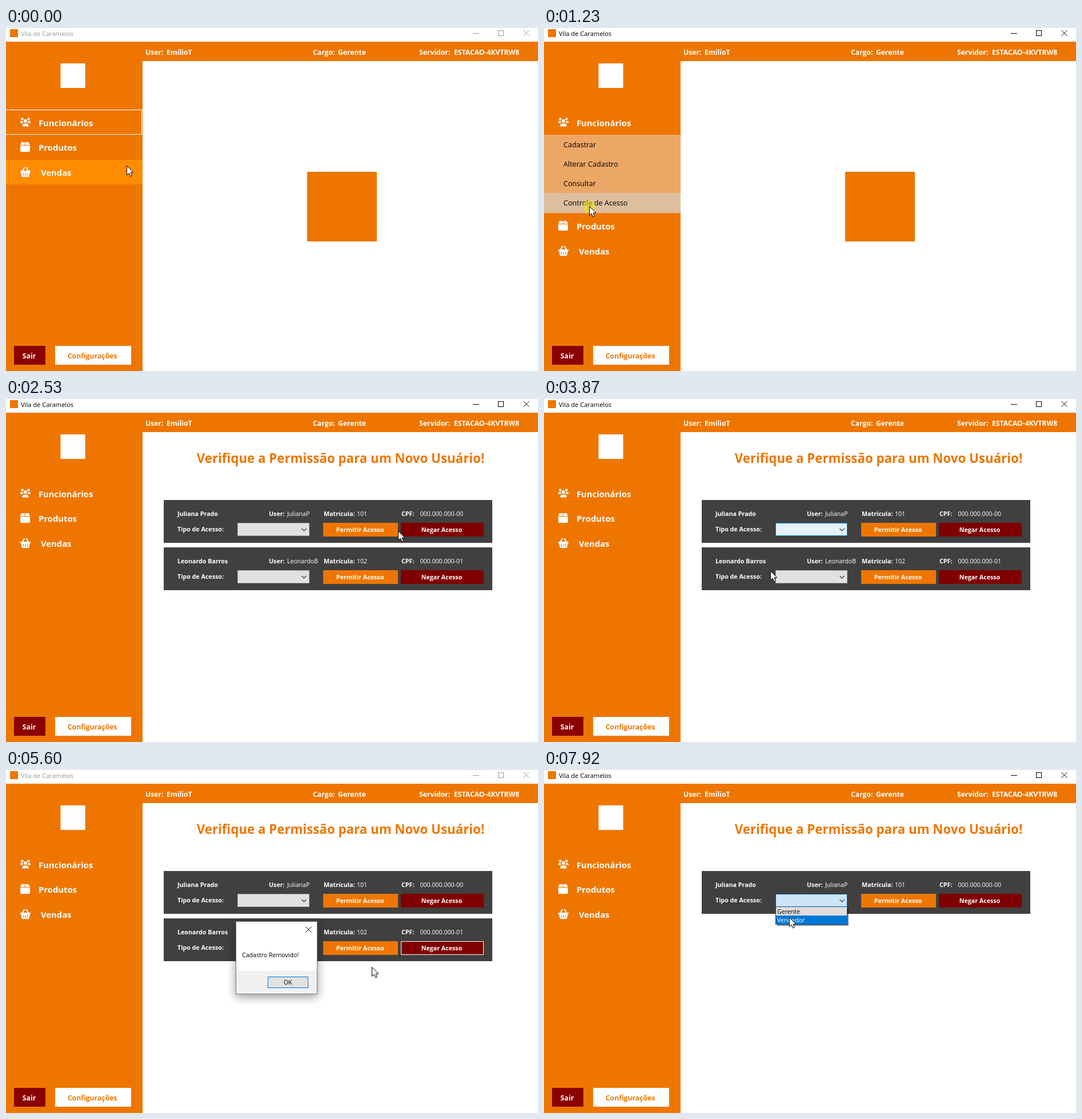
An HTML page with a canvas that plays this animation: 931 by 601 pixels, repeating every 7.99 s.

```html
<!DOCTYPE html>
<html lang="pt">
<head>
<meta charset="utf-8">
<title>Vila de Caramelos</title>
<style>
html, body { margin: 0; width: 100%; height: 100%; overflow: hidden; background: #fff; }
canvas { display: block; width: 100vw; height: 100vh; }
</style>
</head>
<body>
<canvas id="stage" width="931" height="601"></canvas>
<script>
const ctx = document.getElementById('stage').getContext('2d');
const LOOP = 7990;
const ORANGE = '#ee7600', BRIGHT = '#ff8c00', DARK_RED = '#800000', RED = '#e83838';
const SUBMENU = ['Cadastrar', 'Alterar Cadastro', 'Consultar', 'Controle de Acesso'];
const PEOPLE = [
  { name: 'Juliana Prado', user: 'JulianaP', id: '101', cpf: '000.000.000-00' },
  { name: 'Leonardo Barros', user: 'LeonardoB', id: '102', cpf: '000.000.000-01' }
];

// The screen refreshes every 70 ms, counted from the start of each burst.
const BURSTS = [0, 60, 900, 1230, 1360, 1900, 2750, 3590, 4430, 5110, 5940, 6620, 7450];
// Pointer path: time, x, y
const PATH = [
  [60, 211, 241], [340, 150, 172], [550, 146, 172], [830, 105, 240], [1100, 79, 312],
  [1900, 79, 312], [2250, 628, 352], [2530, 686, 231], [2740, 686, 231], [3170, 470, 228],
  [3520, 440, 230], [3590, 438, 232], [3870, 396, 301], [4010, 333, 301], [4360, 606, 297],
  [4430, 640, 292], [4640, 731, 313], [5250, 731, 313], [5870, 569, 370], [6220, 515, 368],
  [6690, 515, 368], [7380, 470, 226], [7520, 470, 226], [7700, 440, 246], [7850, 429, 258]
];
const CLICKS = [[410, 480], [1230, 1360], [5110, 5250], [6620, 6690], [7450, 7520]];

const within = (t, a, b) => t >= a && t < b;

function refreshTime(t) {
  const start = BURSTS.filter(b => b <= t).pop();
  return start + Math.floor((t - start) / 70) * 70;
}

function pointerAt(t) {
  const i = PATH.findIndex(k => k[0] > t);
  if (i === 0) return { x: PATH[0][1], y: PATH[0][2] };
  if (i < 0) return { x: PATH.at(-1)[1], y: PATH.at(-1)[2] };
  const [t0, x0, y0] = PATH[i - 1], [t1, x1, y1] = PATH[i];
  const p = (t - t0) / (t1 - t0);
  return { x: Math.round(x0 + (x1 - x0) * p), y: Math.round(y0 + (y1 - y0) * p) };
}

function rect(x, y, w, h, color) {
  ctx.fillStyle = color;
  ctx.fillRect(x, y, w, h);
}

function frame(x, y, w, h, color) {
  ctx.strokeStyle = color;
  ctx.lineWidth = 1;
  ctx.strokeRect(x + .5, y + .5, w - 1, h - 1);
}

function text(str, x, y, size, color, weight = 400, align = 'left') {
  ctx.font = `${weight} ${size}px "Open Sans", "Noto Sans", sans-serif`;
  ctx.textAlign = align;
  ctx.fillStyle = color;
  ctx.fillText(str, x, y);
}

function line(points, color, width = 1) {
  ctx.beginPath();
  points.forEach(([x, y]) => ctx.lineTo(x, y));
  ctx.strokeStyle = color;
  ctx.lineWidth = width;
  ctx.stroke();
}

function shape(points, color) {
  ctx.beginPath();
  points.forEach(([x, y]) => ctx.lineTo(x, y));
  ctx.closePath();
  ctx.fillStyle = color;
  ctx.fill();
}

function dot(x, y, r, color) {
  ctx.beginPath();
  ctx.arc(x, y, r, 0, 7);
  ctx.fillStyle = color;
  ctx.fill();
}

function round(x, y, w, h, r, color = '#fff') {
  ctx.beginPath();
  ctx.roundRect(x, y, w, h, r);
  ctx.fillStyle = color;
  ctx.fill();
}

function cross(x, y, r, color) {
  line([[x - r, y - r], [x + r, y + r]], color);
  line([[x + r, y - r], [x - r, y + r]], color);
}

function titleBar(active) {
  const ink = active ? '#000' : '#999';
  rect(0, 0, 931, 24, '#fff');
  rect(7, 2, 14, 14, ORANGE);
  text('Vila de Caramelos', 26, 13.5, 11.1, ink);
  rect(817, 9, 11, 1, ink);
  frame(861, 4, 10, 10, ink);
  cross(910.5, 9, 5, ink);
}

function header() {
  rect(0, 24, 931, 34, ORANGE);
  const item = (label, x, value, vx) => {
    text(label, x, 46.5, 12.2, '#fff', 700);
    text(value, vx, 46.5, 12.2, '#fff', 700);
  };
  item('User:', 244, 'EmilioT', 281);
  item('Cargo:', 537, 'Gerente', 581);
  item('Servidor:', 723, 'ESTACAO-4KVTRW8', 784);
}

function peopleIcon(y) {
  [28.5, 39.5].forEach(x => dot(x, y - 6.5, 2.2, '#fff'));
  round(25, y - 3, 5, 3.5, [2, 2, 0, 0]);
  round(38, y - 3, 5, 3.5, [2, 2, 0, 0]);
  dot(34, y - 3, 2.9, '#fff');
  round(28.5, y + 1.5, 11, 5, [4, 4, 1, 1]);
}

function boxIcon(y) {
  shape([[27, y - 9], [32.7, y - 9], [32.7, y - 4], [25, y - 4]], '#fff');
  shape([[33.7, y - 9], [39.5, y - 9], [42, y - 4], [33.7, y - 4]], '#fff');
  round(25, y - 3, 17, 11, [0, 0, 2, 2]);
}

function basketIcon(y, back) {
  line([[28.5, y - 2], [32.5, y - 9]], '#fff', 2);
  line([[39.5, y - 2], [35.5, y - 9]], '#fff', 2);
  round(25, y - 3, 18, 3, 1);
  shape([[26.3, y], [41.7, y], [40, y + 8], [28, y + 8]], '#fff');
  [30, 33.5, 37].forEach(x => rect(x, y + 1.5, 1.2, 4.5, back));
}

function sidebar(t, mouse) {
  const open = within(t, 480, 1360), shift = open ? 138 : 0;
  const over = (y, h) => mouse.x < 238 && mouse.y >= y && mouse.y < y + h;
  rect(0, 24, 239, 577, ORANGE);
  rect(95.5, 62, 43, 43, '#fff');

  const items = [
    ['Funcionários', 57, 144, peopleIcon],
    ['Produtos', 57, 187 + shift, boxIcon],
    ['Vendas', 61, 231 + shift, basketIcon]
  ];
  items.forEach(([label, x, y, icon]) => {
    const back = over(y, 43) ? BRIGHT : ORANGE;
    if (back === BRIGHT) rect(0, y, 239, 43, back);
    icon(y + 22, back);
    text(label, x, y + 28, 14.8, '#fff', 700);
  });
  if (t < 480) {
    rect(0, 143, 238, 1, '#fff');
    rect(0, 186, 238, 1, '#fff');
    rect(237, 143, 1, 44, '#fff');
  }
  if (open) {
    rect(0, 187, 239, 138, '#eca766');
    SUBMENU.forEach((label, i) => {
      const y = 187 + 34 * i;
      if (over(y, 34)) rect(0, y, 239, 34, '#ddbf9f');
      text(label, 34, y + 22, 12.6, '#000');
    });
  }
  rect(14, 557, 55, 33, '#8b0000');
  text('Sair', 40.5, 578.5, 12.2, '#fff', 700, 'center');
  rect(86, 557, 133, 33, '#fff');
  text('Configurações', 151, 578.5, 12.2, ORANGE, 700, 'center');
}

function combo(y, state) {
  const [fill, edge] = {
    idle: ['#e1e1e1', '#adadad'], hover: ['#e5f1fb', '#0078d7'], open: ['#cce4f7', '#005499']
  }[state];
  rect(405, y, 126, 23, fill);
  frame(405, y, 126, 23, edge);
  line([[517.5, y + 10], [521.5, y + 14], [525.5, y + 10]], '#333', 1.2);
}

function button(label, x, y, w, color, hoverColor, mouse) {
  const hover = mouse.x >= x && mouse.x < x + w && mouse.y >= y && mouse.y < y + 24;
  rect(x, y, w, 24, hover ? hoverColor : color);
  text(label, x + w / 2 - 1, y + 15.5, 10.7, '#fff', 700, 'center');
}

function card(person, y, comboState, mouse, focused) {
  const label = (str, x, dy) => text(str, x, y + dy, 10.7, '#fff', 700);
  const value = (str, x) => text(str, x, y + 27.5, 10.6, '#fff');
  rect(276, y, 575, 75, '#404040');
  label(person.name, 300, 27.5);
  label('User:', 460, 27.5);
  value(person.user, 492);
  label('Matrícula:', 556, 27.5);
  value(person.id, 614);
  label('CPF:', 692, 27.5);
  value(person.cpf, 724.5);
  label('Tipo de Acesso:', 300, 54.5);
  combo(y + 40, comboState);
  button('Permitir Acesso', 555, y + 40, 131, ORANGE, BRIGHT, mouse);
  button('Negar Acesso', 691, y + 40, 145, DARK_RED, RED, mouse);
  if (focused) frame(691, y + 40, 145, 24, '#fff');
}

function dropList(mouse) {
  rect(408, 242, 125, 31, 'rgba(0,0,0,.45)');
  rect(405, 239, 126, 32, '#e1dddd');
  frame(405, 239, 126, 32, '#005499');
  ['Gerente', 'Vendedor'].forEach((label, i) => {
    const y = 240 + 15 * i, picked = mouse.y >= y && mouse.y < y + 15;
    if (picked) rect(406, y, 124, 15, '#0078d7');
    text(label, 408, y + 11.5, 10.6, picked ? '#fff' : '#000');
  });
}

function dialog(mouse) {
  ctx.save();
  ctx.shadowColor = 'rgba(0,0,0,.4)';
  ctx.shadowBlur = 16;
  ctx.shadowOffsetY = 5;
  rect(402, 265, 143, 128, '#fff');
  ctx.restore();
  rect(402, 352, 143, 41, '#f0f0f0');
  frame(402, 265, 143, 128, '#777');
  cross(529.5, 279.5, 5, '#000');
  text('Cadastro Removido!', 413, 327.5, 10.6, '#000');
  const hover = mouse.x >= 458 && mouse.x < 529 && mouse.y >= 362 && mouse.y < 382;
  rect(458, 362, 71, 20, hover ? '#e5f1fb' : '#e1e1e1');
  frame(458, 362, 71, 20, '#0078d7');
  text('OK', 493.5, 376, 10.6, '#000', 400, 'center');
}

function accessPage(t, mouse, modal) {
  text('Verifique a Permissão para um Novo Usuário!', 585.5, 112, 22.3, ORANGE, 700, 'center');
  const free = modal ? { x: -1, y: -1 } : mouse;
  const opened = t >= 7520;
  const first = opened ? 'open' : within(t, 3170, 3940) || t >= 7310 ? 'hover' : 'idle';
  card(PEOPLE[0], 177, first, free, false);
  if (t < 6830) {
    const second = within(t, 4080, 4220) ? 'hover' : 'idle';
    card(PEOPLE[1], 260, second, free, t >= 5250);
  }
  if (opened) dropList(mouse);
  if (modal) dialog(mouse);
}

function pointer({ x, y }, pressed) {
  if (pressed) dot(x, y + 1, 11, 'rgba(240,225,30,.6)');
  const outline = [[0, 0], [0, 16], [3.7, 12.6], [6.3, 18.5], [9, 17.3], [6.5, 11.6], [11.4, 11.6]]
    .map(([dx, dy]) => [x + .5 + dx, y + .5 + dy]);
  shape(outline, '#fff');
  line([...outline, outline[0]], '#000');
}

function draw(t) {
  const mouse = pointerAt(t);
  const modal = within(t, 5250, 6760);
  rect(0, 0, 931, 601, '#fff');
  titleBar(t >= 480 && !modal);
  header();
  sidebar(t, mouse);
  if (t < 1360) rect(527, 252, 122, 122, ORANGE);
  else accessPage(t, mouse, modal);
  pointer(mouse, CLICKS.some(([a, b]) => within(t, a, b)));
}

const begin = performance.now();
function tick() {
  draw(refreshTime((performance.now() - begin) % LOOP));
  requestAnimationFrame(tick);
}
tick();
</script>
</body>
</html>
```
